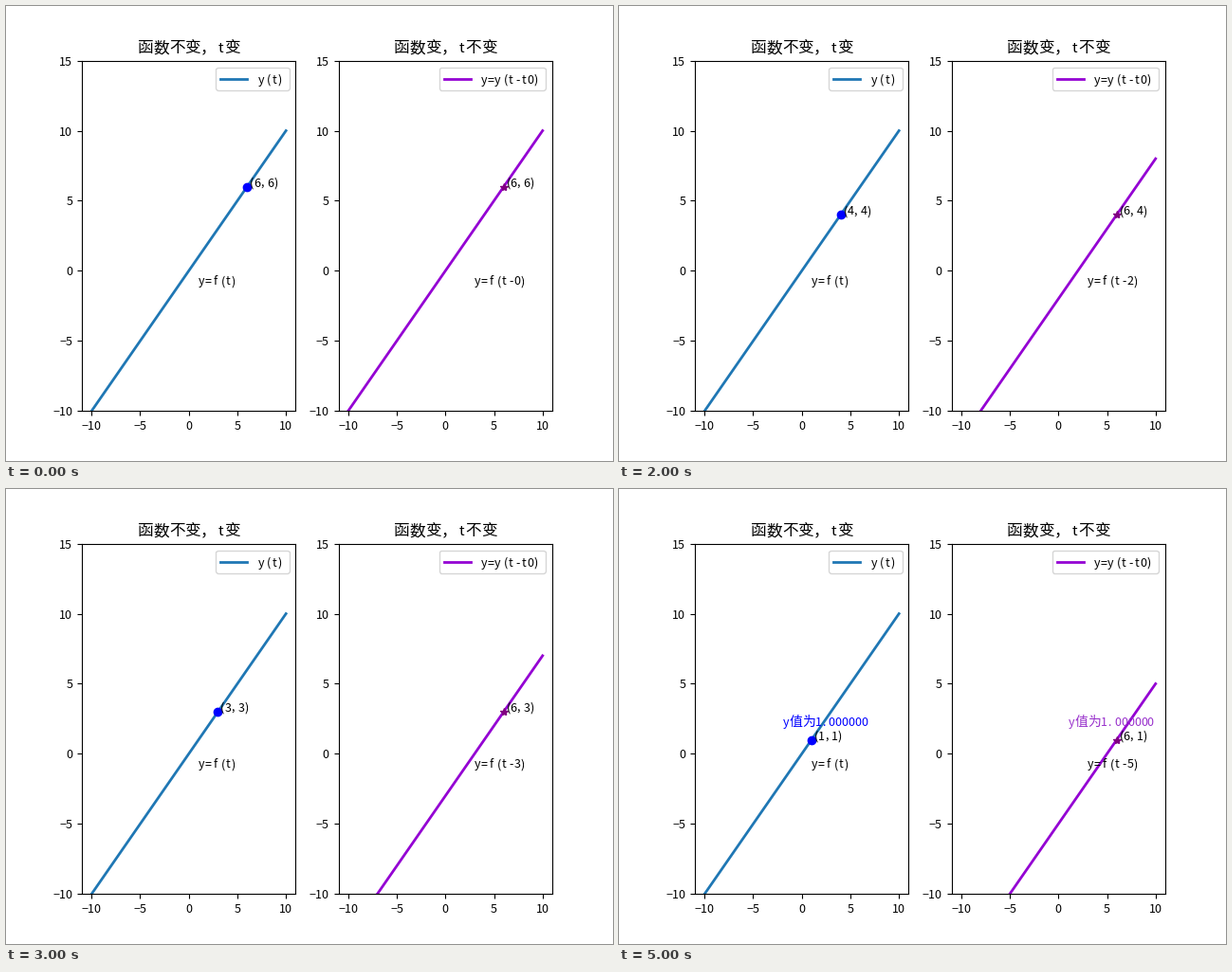
Recreate the animation shown at these times as a matplotlib script. Size 640 by 480 pixels, loop 6000 ms.

```python
import matplotlib.pyplot as plt
import numpy as np
from matplotlib.animation import FuncAnimation
from matplotlib.lines import Line2D
from matplotlib.patches import FancyBboxPatch
from matplotlib.transforms import IdentityTransform

LATIN = 0.9  # Latin glyphs are drawn a little smaller than their em
plt.rcParams["font.family"] = "Noto Sans CJK JP"
plt.rcParams["xtick.labelsize"] = plt.rcParams["ytick.labelsize"] = 10 * LATIN

fig, (left, right) = plt.subplots(1, 2, figsize=(6.4, 4.8), dpi=100)


def is_wide(ch):
    return ord(ch) > 0x2E80


def text_width(s, size):
    return sum(size if is_wide(ch) else size / 2 for ch in s)


def put(ax, s, xy, size=10, color="black", coords="data", start=(0, 0)):
    """Write s on a grid of half-em (Latin) and full-em (CJK) cells."""
    dx, dy = start
    parts = []
    for ch in s:
        cell = size if is_wide(ch) else size / 2
        if is_wide(ch) or ch in "),.":
            ha, shift = "left", 0
        elif ch == "(":
            ha, shift = "right", cell
        else:
            ha, shift = "center", cell / 2
        parts.append(ax.annotate(
            ch, xy, xytext=(dx + shift, dy), xycoords=coords,
            textcoords="offset points", ha=ha, va="baseline", color=color,
            size=size if is_wide(ch) else size * LATIN, zorder=6))
        dx += cell
    return parts


def title(ax, s):
    put(ax, s, (0.5, 1), size=12, coords="axes fraction",
        start=(-text_width(s, 12) / 2, 6))


def legend(ax, s, color):
    em = 10 * fig.dpi / 72
    width = text_width(s, em) + 3.6 * em
    x1 = ax.get_window_extent().x1 - 0.5 * em
    x0, y0, y1 = x1 - width, 391, 415.5
    pixels = IdentityTransform()
    ax.add_artist(FancyBboxPatch(
        (x0, y0), width, y1 - y0, boxstyle="round,pad=0,rounding_size=0.2",
        mutation_scale=em, fc="white", ec="0.8", alpha=0.8, snap=True,
        transform=pixels, clip_on=False, zorder=5))
    hx = x0 + 0.4 * em
    ax.add_artist(Line2D([hx, hx + 2 * em], [403, 403], color=color, lw=2,
                         transform=pixels, clip_on=False, zorder=5.5))
    put(ax, s, (hx + 2.8 * em, 398), coords="figure pixels")


t = np.linspace(-10, 10, 100)
for ax in (left, right):
    ax.set_xlim(-11, 11)
    ax.set_ylim(-10, 15)

left.plot(t, t, color="C0", lw=2)
moving, = right.plot(t, t, color="darkviolet", lw=2)
dot, = left.plot([6], [6], "o", color="blue")
star, = right.plot([6], [6], "*", color="purple")

title(left, "函数不变，t变")
title(right, "函数变，t不变")
legend(left, "y(t)", "C0")
legend(right, "y=y(t-t0)", "darkviolet")
put(left, "y=f(t)", (1, -1))

labels = []


def update(k):
    while labels:
        labels.pop().remove()
    y = 6 - k
    moving.set_ydata(t - k)
    dot.set_data([y], [y])
    star.set_data([6], [y])
    labels.extend(put(left, f"({y},{y})", (y, y)))
    labels.extend(put(right, f"(6,{y})", (6, y)))
    labels.extend(put(right, f"y=f(t-{k})", (3, -1)))
    if k == 5:
        result = f"y值为{y:f}"
        labels.extend(put(left, result, (-2, 2), color="blue"))
        labels.extend(put(right, result, (1, 2), color="darkorchid"))
    return [moving, dot, star] + labels


def init():
    return update(0)


anim = FuncAnimation(fig, update, frames=6, interval=1000, init_func=init,
                     repeat=True, repeat_delay=0, blit=False)
plt.show()
```
